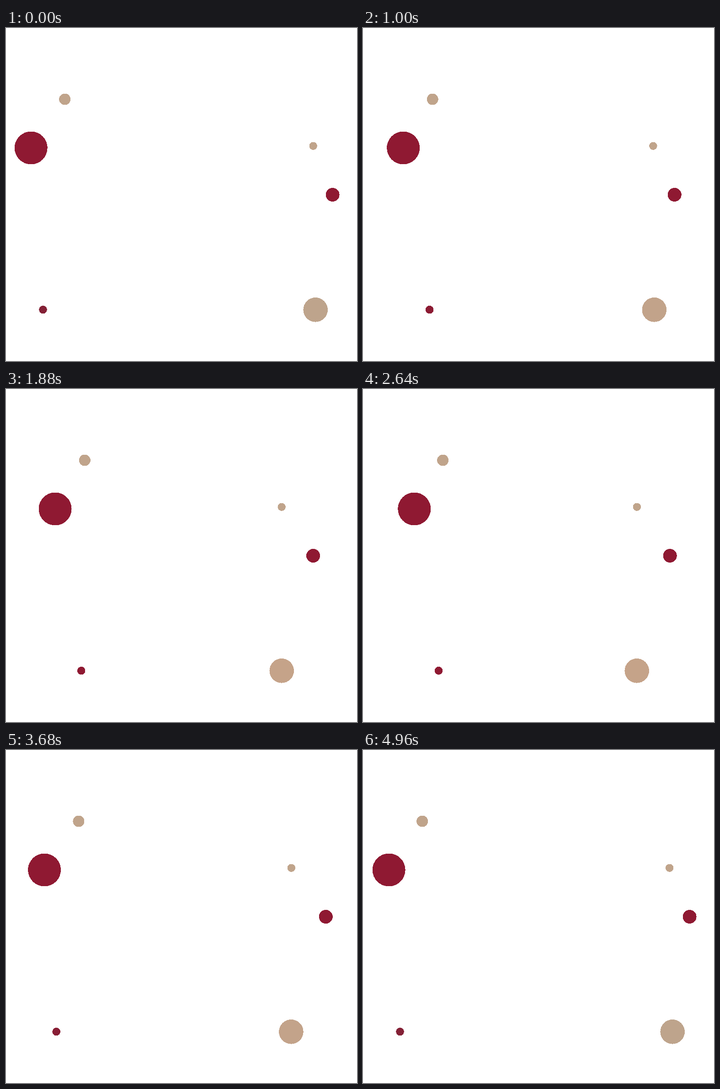
These frames come from a looping animation (768x729 px, 5000 ms). An HTML page:

```html
<!DOCTYPE html>
<html lang="en">
<head>
<meta charset="utf-8">
<title>Drifting dots</title>
<style>
  html, body { margin: 0; width: 100%; height: 100%; overflow: hidden; background: #fff; }
  svg { display: block; width: 768px; height: 729px; }
</style>
</head>
<body>
<svg id="stage" viewBox="0 0 768 729" shape-rendering="crispEdges"></svg>
<script>
const LOOP = 5000, TICK = 40, BACK = 2860;

// Cubic Bézier easing, solved by bisection.
function bezier(x1, y1, x2, y2) {
  const curve = (a, b, s) => 3 * (1 - s) ** 2 * s * a + 3 * (1 - s) * s * s * b + s ** 3;
  return u => {
    if (u <= 0) return 0;
    if (u >= 1) return 1;
    let lo = 0, hi = 1;
    for (let i = 0; i < 24; i++) {
      const mid = (lo + hi) / 2;
      if (curve(x1, x2, mid) < u) lo = mid; else hi = mid;
    }
    return curve(y1, y2, lo);
  };
}

const move = (ms, ...points) => ({ ms, ease: bezier(...points) });
const quick = move(2150, .25, .1, .25, 1);
const soft = move(2450, 0, 0, .58, 1);
const late = move(2500, .42, 0, .3, 1);
const even = move(2200, .4, .26, .6, .94);
const swing = move(2100, .42, 0, .58, 1);

const RED = [143, 25, 50], DULL_RED = [132, 33, 54];
const TAN = [192, 164, 139], COOL_TAN = [190, 164, 140], WARM_TAN = [197, 163, 137];

// The return leg may be cut short by the end of the loop.
const dots = [
  { from: 54.7, to: 112.3, y: 262.5, r: 36, out: soft, back: soft, fill: [RED, RED] },
  { from: 128.7, to: 174.7, y: 156, r: 12.5, out: late, back: late, fill: [TAN, TAN] },
  { from: 672.2, to: 599.3, y: 258.2, r: 8.7, out: late, back: late, fill: [TAN, TAN] },
  { from: 714.6, to: 671.7, y: 365, r: 15, out: quick, back: quick, fill: [RED, RED] },
  { from: 677.2, to: 599.2, y: 616.8, r: 26.8, out: even, back: swing, fill: [COOL_TAN, WARM_TAN] },
  { from: 81, to: 165.5, y: 616.7, r: 8.8, out: quick, back: quick, fill: [DULL_RED, RED] }
];

const stage = document.getElementById("stage");
const mix = (a, b, k) => a + (b - a) * k;

for (const dot of dots) {
  dot.el = document.createElementNS(stage.namespaceURI, "circle");
  dot.el.setAttribute("cy", dot.y);
  dot.el.setAttribute("r", dot.r);
  stage.append(dot.el);
}

function draw(t) {
  for (const { el, from, to, out, back, fill } of dots) {
    const k = t < BACK ? out.ease(t / out.ms) : 1 - back.ease((t - BACK) / back.ms);
    el.setAttribute("cx", mix(from, to, k).toFixed(2));
    el.setAttribute("fill", `rgb(${fill[0].map((c, i) => Math.round(mix(c, fill[1][i], k)))})`);
  }
}

const start = performance.now();
function frame() {
  const t = (performance.now() - start) % LOOP;
  draw(Math.floor(t / TICK) * TICK);
  requestAnimationFrame(frame);
}
frame();
</script>
</body>
</html>
```
